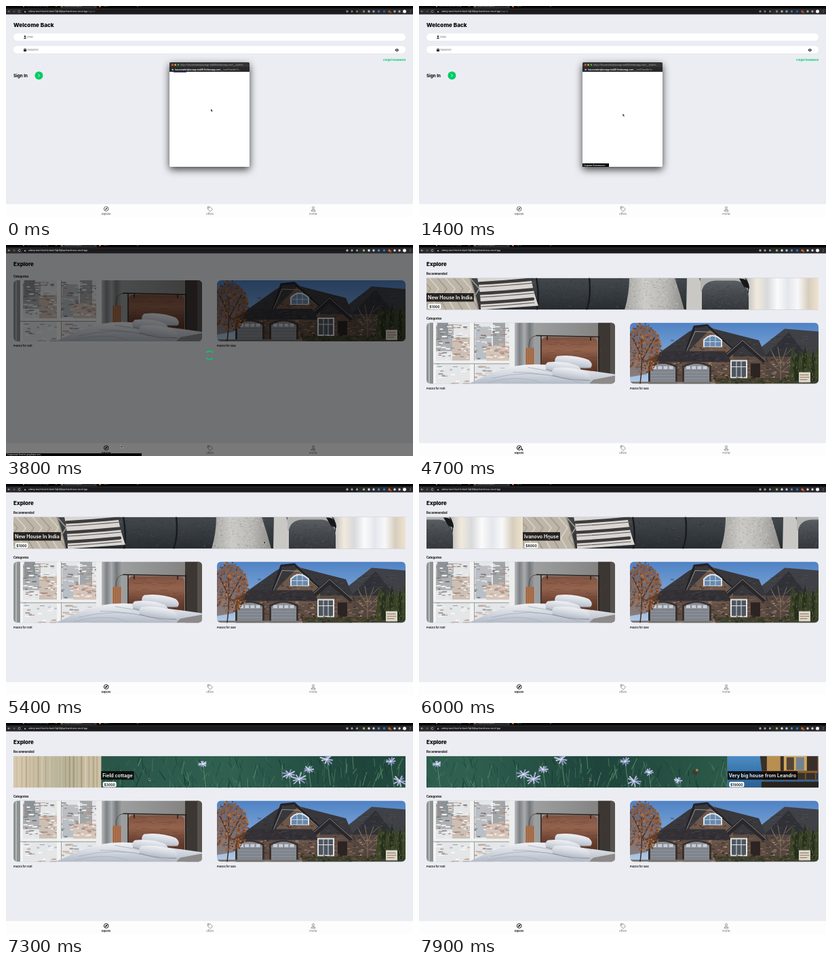
Recreate the animation shown at these times as an HTML page. Size 600 by 311 pixels, loop 8000 ms.

```html
<!DOCTYPE html>
<html lang="en">
<head>
<meta charset="utf-8">
<title>House listings</title>
<style>
  html, body { margin: 0; width: 100%; height: 100%; overflow: hidden; background: #ecedf2; }
  svg { display: block; }
  #stage { width: 600px; height: 311px; font-family: Inter, "Open Sans", sans-serif; }
  .ui { font-family: Roboto, "Open Sans", sans-serif; }
  #popup > rect:first-child { filter: drop-shadow(0 4px 6px #000b); }
</style>
</head>
<body>
<svg id="stage" viewBox="0 0 600 311"></svg>
<script>
const LOOP = 8000, POPUP_END = 3200, HOME = 3700, LOADED = 4400;
const W = 578, GREEN = '#00cc66';

let seed = 11;
const rnd = (a = 0, b = 1) => a + (b - a) * (seed = seed * 16807 % 2147483647) / 2147483647;
const pick = list => list[Math.floor(rnd(0, list.length))];
const repeat = (n, fn) => Array.from({ length: n }, (_, i) => fn(i)).join('');

const rect = (x, y, w, h, fill, more = '') =>
  `<rect x="${x}" y="${y}" width="${w}" height="${h}" fill="${fill}" ${more}/>`;
const dot = (x, y, r, fill, more = '') => `<circle cx="${x}" cy="${y}" r="${r}" fill="${fill}" ${more}/>`;
const shape = (d, fill, more = '') => `<path d="${d}" fill="${fill}" ${more}/>`;
const line = (d, color, w = 1) => shape(d, 'none', `stroke="${color}" stroke-width="${w}" stroke-linecap="round" stroke-linejoin="round"`);
const text = (x, y, size, weight, fill, str, more = '') =>
  `<text x="${x}" y="${y}" font-size="${size}" font-weight="${weight}" fill="${fill}" ${more}>${str}</text>`;
const group = (id, body, more = '') => `<g id="${id}" ${more}>${body}</g>`;
const gradient = (id, stops, dir = 'x2="1" y2="0"') =>
  `<linearGradient id="${id}" ${dir}>` +
  stops.map((c, i) => `<stop offset="${i / (stops.length - 1)}" stop-color="${c}"/>`).join('') +
  '</linearGradient>';
const DOWN = 'x2="0" y2="1"';

// Random flecks for texture: w and h are the largest fleck size.
const flecks = (n, x1, y1, x2, y2, w, h, colors, alpha = 1) => repeat(n, () =>
  rect(rnd(x1, x2), rnd(y1, y2), rnd(w / 3, w), rnd(h / 3, h), pick(colors), `opacity="${alpha}"`));

const defs = '<defs>' +
  gradient('wall', ['#a4a9ac', '#a2a5a6', '#7d7c7a']) +
  gradient('drape', ['#b9bcbe', '#7d8184', '#a9acad', '#74787b', '#9a9d9e']) +
  gradient('leather', ['#7d5140', '#93634d', '#6d4232', '#54301f'], DOWN) +
  gradient('sheet', ['#f0f1f4', '#d3d8e0', '#b3bac6'], DOWN) +
  gradient('sky', ['#4f82c4', '#79a3d6', '#b4cbe5'], DOWN) +
  gradient('sofa', ['#43484c', '#363b3f', '#282c30'], DOWN) +
  gradient('arm', ['#5a5e62', '#44484c', '#34373b'], DOWN) +
  gradient('knit', ['#a5a4a1', '#cbcac7', '#bbbab6', '#8f8e8b']) +
  gradient('cream', ['#bfc0c0', '#f1e9dc', '#d8d9dc', '#fbfbfb', '#e3e6ec', '#f8f8f9', '#d7cdbd', '#efe3cf']) +
  gradient('linen', ['#cbb797', '#a88e6b', '#d2bf9f', '#a58b68', '#c9b594', '#b6a17f', '#d3c6ab', '#b5b298', '#cfc3a8']) +
  gradient('meadow', ['#2a5548', '#2f6050', '#1f443b', '#2c5a49']) +
  gradient('lake', ['#4b8cc4', '#3a75ad', '#2c5f90'], DOWN) +
  '<clipPath id="card"><rect width="278" height="90" rx="6"/></clipPath>' +
  '<clipPath id="strip"><rect x="11" y="48.5" width="578" height="47"/></clipPath>' +
  '<clipPath id="slide"><rect width="578.5" height="47"/></clipPath></defs>';

function bedroom() {
  const pillow = (x, y, w, h, tilt) => `<g transform="translate(${x} ${y}) rotate(${tilt})">` +
    shape(`M2 ${h - 2}Q-2 ${h / 2} 3 2Q${w / 2} -4 ${w - 4} 2Q${w + 4} ${h / 2} ${w} ${h - 2}Q${w / 2} ${h + 3} 2 ${h - 2}Z`, 'url(#sheet)') +
    line(`M2 ${h - 1.5}Q${w / 2} ${h + 3} ${w} ${h - 2}`, '#8d8c92', 1) + '</g>';
  return rect(0, 0, 278, 90, 'url(#wall)') +
    rect(0, 0, 135, 90, '#e4e6e8') +
    rect(12, 4, 28, 38, '#aeb0b2') + rect(16, 0, 16, 24, '#8b9399') +
    rect(38, 22, 26, 34, '#cdbfb4') + rect(72, 6, 24, 48, '#b9bfc5') +
    rect(98, 0, 18, 40, '#a2a5a7') + rect(88, 34, 42, 24, '#d6c4b8') +
    flecks(170, 12, 2, 124, 54, 8, 2, ['#f6f6f5', '#707a84', '#b58d7c', '#f3f3f2', '#96908a', '#d8b5a4']) +
    flecks(60, 12, 60, 118, 90, 10, 2.500, ['#f6f6f5', '#9aa0a5', '#c7a99a', '#b7bcc0']) +
    rect(0, 0, 10, 90, '#8d9193') + rect(3, 0, 2, 90, '#b5b7b8') + rect(10, 0, 4, 90, '#f4f4f3') +
    rect(64, 0, 7, 90, '#f3f3f2') + rect(70, 0, 1, 90, '#9a9d9f') +
    rect(10, 56, 122, 4, '#f0f1f1') + rect(10, 60, 122, 1, '#92979a') +
    rect(122, 0, 8, 70, '#eceded') + rect(130, 0, 29, 78, 'url(#drape)') +
    rect(253, 0, 25, 90, '#3d3734') + rect(271, 0, 7, 90, '#57514d') +
    shape('M170 26Q171 21 178 21L245 22Q252 23 252 29V76H170Z', 'url(#leather)') +
    flecks(60, 172, 24, 250, 55, 12, 1, ['#a06f58', '#5d3728'], .4) +
    line('M162 19L255 21M169 20V62M254 20V76M178 20V25M242 21V26', '#2a1d18', 1.6) +
    line('M151 38Q150 20 162 19', '#4b3b32', .8) +
    rect(146, 37, 13, 28, '#b9805a', 'rx="1.500"') +
    repeat(4, i => rect(147.5 + i * 3, 37, 1, 28, '#7e4b31')) +
    shape('M62 90L104 71Q135 59 178 62L278 76V90Z', 'url(#sheet)') +
    line('M96 82Q150 68 205 82M128 73Q170 72 230 89M90 88Q140 76 170 89M150 66Q190 72 250 88', '#a9b1bf', .9) +
    pillow(190, 47, 54, 15, 7) + pillow(176, 56, 52, 14, 7) + pillow(186, 64, 56, 15, 8) +
    shape('M246 84L278 78V90H240Z', '#8d8a8a');
}

function house() {
  const garage = x =>
    shape(`M${x - 3} 90V64Q${x + 18} 52 ${x + 40} 64V90Z`, '#3a3230') +
    shape(`M${x} 88V66Q${x + 18} 55 ${x + 37} 66V88Z`, '#888d95') +
    repeat(4, i => rect(x + 3 + i * 8.2, 64, 6, 4.5, '#c9ced6')) +
    repeat(4, i => line(`M${x + 1} ${71 + i * 4.5}H${x + 36}`, '#636972', .6));
  const stones = ['#89705f', '#4d3b33', '#9b8370', '#3c302c', '#6f5a4d'];
  return rect(0, 0, 278, 90, 'url(#sky)') +
    shape('M186 42L228 9L278 13V66H186Z', '#3f4147') +
    shape('M194 54L234 14L262 50Z', '#303238') +
    flecks(90, 205, 18, 268, 55, 6, .8, ['#5a5c62', '#26282c'], .7) +
    rect(196, 50, 82, 34, '#54463e') +
    flecks(60, 196, 52, 276, 80, 6, 2.500, ['#7b675a', '#39302c', '#8e8074']) +
    shape('M24 58L86 14L104 4L190 26L204 58H24Z', '#38373b') +
    flecks(120, 55, 25, 186, 52, 6, .8, ['#545257', '#252428'], .8) +
    rect(28, 50, 172, 40, '#5f4c42') +
    shape('M88 40L121 7L152 40V62H88Z', '#6d574a') +
    flecks(60, 94, 32, 148, 58, 5, 2, stones) +
    flecks(300, 29, 52, 196, 86, 5, 2, stones) +
    line('M82 44L95 6L114 4L150 38', '#232327', 3.5) +
    line('M83 43L96 13L121 14L151 40', '#bfb9b3', .7) +
    shape('M108 36V25Q121 11 136 25V36Z', '#dce4ec') +
    shape('M110 35V26Q121 14 134 26V35Z', '#6789ae') +
    line('M118 18V35M126 18V35M110 28H134', '#e2e5e8', .8) +
    shape('M136 50L166 24L202 57L196 59L166 34L142 55Z', '#29282c') +
    line('M138 51L166 26L201 57', '#b5aea7', .7) +
    shape('M16 60L52 42H140L150 58H26Z', '#333136') +
    flecks(60, 45, 44, 138, 56, 6, .8, ['#514f54', '#222125'], .8) +
    rect(148, 55, 25, 27, '#e2e3e5') + rect(150, 57, 21, 23, '#4d565f') +
    line('M157 57V80M164 57V80M150 65H171', '#e2e3e5', 1) +
    rect(178, 60, 14, 24, '#2b2423') +
    garage(30) + garage(80) +
    rect(0, 87, 278, 3, '#77736d') + rect(126, 82, 152, 8, '#3f4030') +
    flecks(90, 122, 78, 270, 88, 5, 2.500, ['#2b3020', '#5d5c40', '#6d4c35']) +
    line('M222 84V55M222 66L210 45M222 62L231 38M222 58L218 36M222 67L240 48M213 51L208 40M230 47L238 39M222 72L206 58M222 74L238 60', '#8a7360', .9) +
    repeat(7, i => shape(`M${236 + i * 6} 86Q${235 + i * 6} 55 ${240 + i * 6} ${34 + i % 3 * 4}Q${246 + i * 6} 55 ${245 + i * 6} 86Z`,
      i % 2 ? '#262f1f' : '#3a4527')) +
    flecks(120, 238, 44, 278, 84, 1.5, 5, ['#4e5a33', '#1d2418', '#66653c'], .8) +
    shape('M0 14Q20 -6 36 12Q50 26 44 44Q38 62 24 76L0 80Z', '#74482d', 'opacity=".55"') +
    line('M15 90Q19 60 17 25M18 55L36 22M17 50L4 22', '#3c2b24', 1.5) +
    repeat(420, () => {
      const a = rnd(0, 6.3), r = Math.sqrt(rnd());
      return dot(19 + 28 * r * Math.cos(a), 38 + 37 * r * Math.sin(a), rnd(.5, 1.5),
        pick(['#9a5630', '#b8703a', '#6c3f28', '#84502f']));
    }) +
    rect(249, 73, 17, 15, '#d9d6cc') + line('M251 77H263M251 80.500H264M251 84H261', '#96724f', 1);
}

function cushions() {
  return rect(0, 0, W, 47, 'url(#sofa)') +
    flecks(500, 155, 0, 410, 47, 2.5, 1, ['#565b60', '#202327'], .5) +
    line('M162 0Q167 28 163 47M240 0Q243 30 236 47', '#191b1e', 2.5) +
    shape('M0 0H64Q72 22 77 47H0Z', '#bdb6a8') +
    repeat(7, i => line(`M${i * 12 - 8} 0l14 16-10 15 9 16`, i % 2 ? '#d8d2c6' : '#a29a8b', 1.6)) +
    line('M64 0Q72 22 77 47', '#8e887c', 1.5) +
    shape('M75 0H154Q158 22 165 41L80 47Q80 20 75 0Z', '#d9d6d2') +
    [5, 20, 34].map(y => line(`M78 ${y + 3}Q115 ${y + 1} 157 ${y - 3}`, '#3e3b3c', 4.5) +
      line(`M79 ${y + 8.5}Q115 ${y + 6.5} 159 ${y + 2.5}`, '#5d5a5a', 1.2)).join('') +
    shape('M299 0H366Q374 24 380 47H292Q299 24 299 0Z', 'url(#knit)') +
    flecks(420, 299, 0, 370, 47, 2, 1, ['#85847f', '#e2e1de'], .6) +
    shape('M384 0H402Q413 22 411 47H383Z', '#c9c8c5') +
    line('M402 0Q413 22 411 47', '#86858a', 1) +
    rect(404, 0, 74, 20, '#b3b3b1') +
    shape('M474 0H578V47H472Z', 'url(#cream)') +
    shape('M406 47V19Q409 5 426 4H455Q474 6 475 28V47Z', 'url(#arm)') +
    flecks(200, 410, 9, 471, 47, 2.5, 1, ['#666a6e', '#2f3236'], .5) +
    shape('M461 1Q476 0 476 16L468 13Z', '#17181a') + line('M470 0Q476 8 474 22', '#17181a', 1.2);
}

const curtains = () => rect(0, 0, W, 47, '#dde0d4') +
  rect(0, 0, 5, 47, '#c7b396') + rect(5, 0, 9, 47, '#46331f') + rect(14, 0, 6, 47, '#8f785b') +
  rect(20, 0, 12, 47, '#3f2f20') + rect(32, 0, 6, 47, '#b9b49f') +
  shape('M62 0H90L76 47H54Z', '#f2f4ec') + rect(98, 0, 14, 47, '#ecece2') +
  rect(112, 0, 466, 47, 'url(#linen)') +
  repeat(80, i => rect(113 + i * 5.8, 0, rnd(.6, 3), 47, pick(['#e2d6bf', '#8f7653', '#cdbb9b', '#a38a66']), 'opacity=".45"'));

function flowers() {
  const bloom = (x, y, r) => repeat(9, i => {
    const a = i * .7 + rnd(-.2, .2), l = r * rnd(.7, 1.1);
    return line(`M${x} ${y}L${x + l * Math.cos(a)} ${y + l * .8 * Math.sin(a)}`, pick(['#a9b3d6', '#c4cbe3', '#8995c4']), 2);
  }) + dot(x, y, 1.5, '#dfe1ef');
  return rect(0, 0, W, 47, 'url(#meadow)') +
    repeat(260, () => {
      const x = rnd(0, W), y = rnd(0, 47);
      return line(`M${x} ${y}l${rnd(-9, 9)} ${rnd(6, 22)}`, pick(['#42735a', '#17382f', '#4f7f62', '#214a3d']), rnd(.4, 1.3));
    }) +
    [[150, 12, 6], [277, 27, 9], [292, 34, 11], [306, 20, 7], [333, 5, 10], [427, 8, 8], [440, 37, 10], [462, 24, 6], [505, 36, 6]]
      .map(f => line(`M${f[0]} ${f[1]}l5 38`, '#5c8a68', 1) + bloom(...f)).join('') +
    dot(530, 24, 4, '#3d3c36') + dot(533, 21, 2, '#a88742');
}

const porch = () => rect(0, 0, W, 47, 'url(#lake)') +
  shape('M48 0H133V35H52Z', '#3a2f28') + rect(58, 0, 20, 24, '#b98f50') +
  rect(83, 0, 34, 22, '#d2a761') + rect(87, 2, 11, 19, '#544536') + rect(101, 2, 12, 19, '#718391') +
  rect(50, 22, 528, 3, '#8a6237') + repeat(36, i => rect(54 + i * 15, 25, 2, 15, '#71512f')) +
  rect(50, 38, 528, 9, '#28241f') + rect(133, 0, 445, 22, '#9b7445');

const slides = [
  [cushions(), 'New House In India', '$1000'],
  [cushions(), 'Ivanovo House', '$8000'],
  [curtains(), 'very Small domik', '$1000 / month'],
  [flowers(), 'Field cottage', '$3000'],
  [porch(), 'Very big house from Leandro', '$19000']
].map(([art, name, price], i) =>
  `<g transform="translate(${i * W})"><g clip-path="url(#slide)">${art}</g>` +
  rect(0, 22.5, 0, 12.5, '#000c', 'data-pad="2"') + text(2, 31.2, 7.1, 600, '#fff', name) +
  rect(2.5, 38.3, 0, 7.8, '#fff', 'rx="2" data-pad="1.8"') + text(4.3, 44, 5, 600, '#000', price) + '</g>').join('');

const input = (y, label) => rect(11, y + .6, W, 11, '#dfe1e6', 'rx="5.500"') + rect(11, y, W, 11, '#fff', 'rx="5.500"') +
  text(30.5, y + 6.9, 3.7, 400, '#777', label);

const signIn = text(11, 31, 8.2, 800, '#000', 'Welcome Back') +
  input(40.5, 'Email') + input(59, 'Password') +
  dot(28, 44.7, 1.2, '#222') + shape('M25.800 48.300Q28 44.500 30.200 48.300Z', '#222') +
  rect(26, 64, 4, 3, '#222', 'rx=".5"') + line('M26.800 64V63Q28 61.500 29.200 63V64', '#222', .7) +
  shape('M573.500 65Q576.300 61 579 65Q576.300 69 573.500 65Z', '#111') + dot(576.3, 65, .9, '#fff') +
  text(589, 81.2, 4, 700, GREEN, 'Forgot Password', 'text-anchor="end"') +
  text(11, 104.8, 6.3, 700, '#000', 'Sign In') +
  dot(48.5, 102.5, 6, GREEN) + line('M47.800 100.800L49.500 102.500L47.800 104.200', '#fff', .9);

const card = (x, art, label) => `<g transform="translate(${x} 52)" clip-path="url(#card)">${art}</g>` +
  text(x, 150.2, 3.95, 600, '#111', label);
const home = text(11, 31, 8, 800, '#000', 'Explore') +
  group('rec', text(11, 43.8, 4.2, 700, '#000', 'Recommended') +
    `<g clip-path="url(#strip)">${group('track', slides)}</g>` +
    repeat(5, i => dot(292.5 + i * 3.9, 91.2, .8, '#000', 'class="bullet"'))) +
  group('cats', text(11, 47.6, 4.2, 700, '#000', 'Categories') +
    card(11, bedroom(), 'Places for rent') + card(311, house(), 'Places for sale'));

const tab = (x, label, icon) => `<g fill="none" stroke="#777" stroke-width=".8">${icon}</g>` +
  text(x, 307.6, 3.7, 600, '#888', label, 'text-anchor="middle"');
const nav = rect(0, 292, 600, 19, '#fdfdfd') +
  group('explore', dot(147.7, 299, 3.3, 'none', 'stroke="#555" stroke-width=".9"') +
    shape('M149.600 297L148.500 299.800L145.800 301L146.900 298.200Z', '#555') +
    text(147.7, 307.6, 3.7, 600, '#666', 'Explore', 'text-anchor="middle"')) +
  tab(300.5, 'Offers', '<path d="M297.300 295.800H300.500L304.500 299.800L301.200 303L297.300 299Z"/><circle cx="299" cy="297.600" r=".5"/>') +
  tab(453, 'Profile', '<circle cx="453" cy="297.500" r="1.600"/><path d="M449.900 302.300Q450 300.200 453 300.200T456.100 302.300Z"/>');

const loading = rect(0, 12, 600, 299, '#000', 'opacity=".52"') +
  group('ring', line('M-4.300 -4.300A6.100 6.100 0 0 1 4.300 -4.300M4.300 4.300A6.100 6.100 0 0 1 -4.300 4.300', GREEN, 1.7)) +
  rect(0, 307, 200, 4, '#050505') +
  text(1.5, 310.2, 2.9, 400, '#ddd', 'Соединение firestore.googleapis.com…', 'class="ui"');

const popupHost = 'housemarketplaceapp-wxk48.firebaseapp.com';
const popup = rect(241, 83, 118, 154, '#fff', 'rx="1.500"') +
  shape('M241 97V84.500Q241 83 242.500 83H357.500Q359 83 359 84.500V97Z', '#343436') + rect(241, 90, 118, 7, '#28282a') +
  ['#ff5f57', '#febc2e', '#28c840'].map((c, i) => dot(245.3 + i * 4.3, 86.7, 1.3, c)).join('') +
  text(257.5, 87.9, 3.2, 400, '#aaa', `https://${popupHost}/__/auth/h…`, 'class="ui"') +
  rect(244.5, 93, 2.4, 1.9, '#aaa') + line('M245 93Q245.700 91.500 246.400 93', '#aaa', .5) +
  text(249, 94.7, 3.2, 500, '#fff', `${popupHost}<tspan fill="#999">/__/auth/handler?a…</tspan>`, 'class="ui"') +
  rect(247, 97, 19, 1, '#3f5183', 'id="progress"') +
  group('secure', rect(241, 232, 39, 5, '#000') +
    text(242.5, 235.7, 2.9, 500, '#fff', 'Создание безопасного…', 'class="ui"'));

const icons = [[503, '#aaa'], [510, '#999'], [517.5, '#999'], [527.5, '#8fbf6a'], [535, '#e6e6e6'], [542, '#b9cde0'],
  [549.5, '#4a8fe8'], [557.5, '#2f74d6'], [565, '#e2702a'], [573, '#ddd'], [580, '#ddd']];
const browser = rect(0, 0, 600, 12, '#050506') + rect(0, 3.6, 600, 8.8, '#29292c') +
  rect(80, 0, 54, 3.6, '#29292c') + rect(23, 5, 497, 6.4, '#1b1b1d', 'rx="3.200"') +
  dot(26, .3, 1.2, '#888') + dot(82.5, .3, 1.2, '#dc8b27') + dot(138.5, .3, 1.6, '#e36b34') +
  text(30, 1, 3, 400, '#999', 'react house project page', 'class="ui"') +
  text(86, 1, 3, 400, '#ccc', 'House Marketplace', 'class="ui"') + text(142, 1, 3, 400, '#999', 'Project', 'class="ui"') +
  line('M73 -.5L75 1M75 -.5L73 1M130 -.5L132 1M194 -1V1M193 0H195', '#aaa', .5) +
  group('tools', line('M6 8H3M4.200 6.800L3 8L4.200 9.200M21 7A1.600 1.600 0 1 0 21 9', '#ddd', .6) +
    line('M10.500 8H13M12 6.800L13 8L12 9.200', '#888', .6) +
    icons.map(([x, c]) => dot(x, 8, 1.7, c)).join('') + dot(567, 9.6, 1.4, '#b84d21') +
    repeat(3, i => dot(596, 6.5 + i * 1.5, .45, '#ddd'))) +
  rect(27, 7.6, 2.2, 1.8, '#aaa') + dot(587.5, 8, 2.5, '#f4f4f4') +
  text(33, 9.2, 3.3, 400, '#eee', 'udemy-react-front-to-back-3qb3djbqs-leandrvoss.vercel.app<tspan id="path" fill="#888">/sign-in</tspan>', 'class="ui"');

const $ = id => document.getElementById(id);
$('stage').innerHTML = defs + rect(0, 0, 600, 311, '#ecedf2') + group('sign', signIn) + group('home', home) + nav +
  group('loading', loading) + group('popup', popup) + browser +
  group('cursor', shape('M0 0V4.200L1 3.300L1.700 4.900L2.400 4.600L1.700 3.100H3Z', '#111', 'stroke="#fff" stroke-width=".35"'));

// Size each caption box to its text.
function fitBoxes() {
  document.querySelectorAll('[data-pad]').forEach(box =>
    box.setAttribute('width', box.nextElementSibling.getComputedTextLength() + 2 * box.dataset.pad));
}
fitBoxes();
document.fonts.ready.then(fitBoxes);

// Keys are [time, ...values].
const slideKeys = [[5550, 0], [6000, .753], [6200, 1], [6330, 1], [6600, 1.623], [6850, 2], [7000, 2],
  [7250, 2.7], [7450, 3], [7720, 3], [7900, 3.23], [8000, 3.45]];
const cursorKeys = [[0, 302, 151.5], [1700, 300, 160], [2700, 198, 281], [2800, 189, 287], [3600, 172, 294],
  [3800, 169.5, 295], [4400, 151, 299], [4900, 151, 299], [5400, 380, 84], [5550, 390, 80], [6000, 190.5, 77],
  [6150, 165, 78], [6330, 390, 78], [6600, 222, 73.5], [6750, 190, 75], [7000, 400, 80], [7300, 210, 81],
  [7720, 386, 81], [7900, 252, 81], [8000, 190, 81]];

function at(keys, t) {
  const i = keys.findIndex(k => k[0] > t);
  if (i === 0) return keys[0].slice(1);
  if (i < 0) return keys[keys.length - 1].slice(1);
  const [a, b] = [keys[i - 1], keys[i]], f = (t - a[0]) / (b[0] - a[0]);
  return a.slice(1).map((v, n) => v + (b[n + 1] - v) * f);
}

const show = (id, on) => { $(id).style.display = on ? '' : 'none'; };
const move = (id, x, y, more = '') => $(id).setAttribute('transform', `translate(${x} ${y})${more}`);
const bullets = document.querySelectorAll('.bullet');

function draw(t) {
  const isHome = t >= HOME, loaded = t >= LOADED, focused = t >= POPUP_END;
  show('sign', !isHome);
  show('home', isHome);
  show('path', !isHome);
  show('rec', loaded);
  show('loading', isHome && !loaded);
  show('popup', !focused);
  show('progress', t < 1000);
  show('secure', t >= 1000);
  $('tools').setAttribute('opacity', focused ? 1 : .7);
  $('explore').style.filter = isHome ? 'brightness(0)' : '';
  move('cats', 0, loaded ? 62.5 : 0);
  move('ring', 300, 162.5, ` rotate(${(t - 3800) * .3})`);
  const [pos] = at(slideKeys, t);
  move('track', 11 - pos * W, 48.5);
  bullets.forEach((b, i) => {
    const on = i === Math.round(pos);
    b.setAttribute('fill', on ? '#007aff' : '#000');
    b.setAttribute('opacity', on ? 1 : .25);
  });
  move('cursor', ...at(cursorKeys, t));
}

const start = performance.now();
function tick(now) {
  draw(Math.max(0, now - start) % LOOP);
  requestAnimationFrame(tick);
}
tick(start);
</script>
</body>
</html>
```
